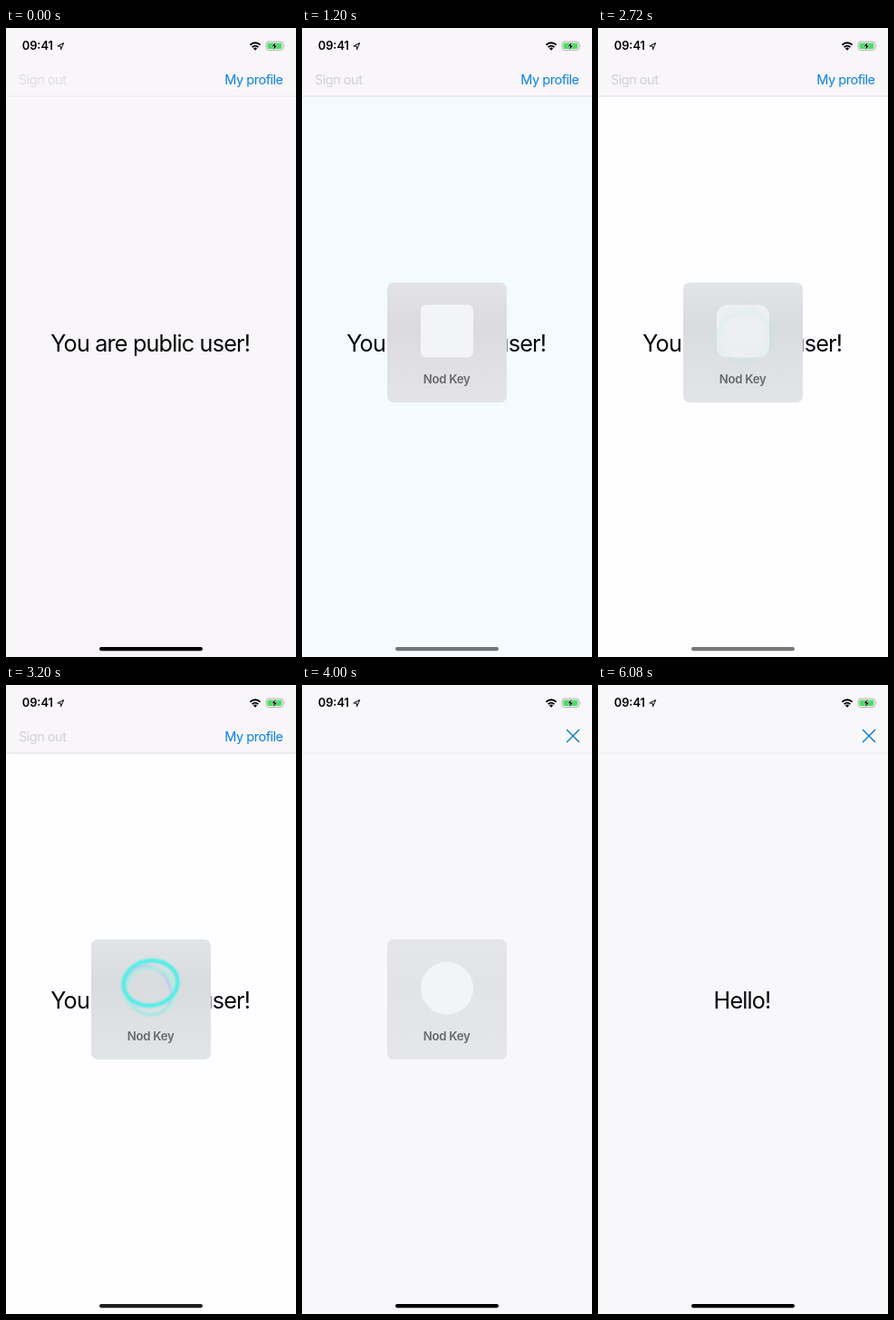
Animation of 320x692 px, one loop 6.16 s. Source, as an HTML page:

```html
<!DOCTYPE html>
<html lang="en">
<head>
<meta charset="utf-8">
<title>Profile unlock</title>
<style>
  html, body { margin: 0; width: 100%; height: 100%; overflow: hidden; background: #f8f6f9; }
  svg { display: block; width: 100vw; height: 100vh; }
  text { font-family: Inter, Roboto, "Liberation Sans", sans-serif; }
  .title { font-size: 25.2px; letter-spacing: -.82px; text-anchor: middle; fill: #08080a; }
  .nav { font-size: 14.5px; letter-spacing: -.48px; }
  .clock { font-size: 12.8px; font-weight: 600; letter-spacing: 0; }
  .label { font-size: 13.2px; font-weight: 600; letter-spacing: -.3px; text-anchor: middle; fill: #68696c; }
</style>
</head>
<body>
<svg viewBox="0 0 320 692" xmlns="http://www.w3.org/2000/svg">
  <defs>
    <linearGradient id="shade" x2="0" y2="1">
      <stop offset="0" stop-color="#85858a" stop-opacity="0"/>
      <stop offset=".38" stop-color="#85858a" stop-opacity=".1"/>
      <stop offset=".62" stop-color="#85858a" stop-opacity=".05"/>
      <stop offset="1" stop-color="#85858a" stop-opacity="0"/>
    </linearGradient>
    <filter id="soft" x="-30%" y="-30%" width="160%" height="160%">
      <feGaussianBlur stdDeviation=".8"/>
    </filter>
  </defs>

  <g id="home">
    <rect id="homeBody" width="320" height="692"/>
    <rect id="homeBar" width="320" height="75" fill="#f8f6f9"/>
    <rect id="homeLine" y="74.6" width="320" height=".9"/>
    <text id="signOut" class="nav" x="13.9" y="61.5">Sign out</text>
    <text class="nav" x="305.6" y="61.5" text-anchor="end" fill="#0a7ff0">My profile</text>
    <text class="title" x="159.2" y="355.5">You are public user!</text>
  </g>

  <g id="modal">
    <rect width="320" height="692" fill="#f8f7fa"/>
    <rect y="74.6" width="320" height=".9" fill="#e9e8eb"/>
    <path d="M292 49l14 14m0-14l-14 14" stroke="#147fd2" stroke-width="1.5"/>
    <text class="title" x="159" y="355.5">Hello!</text>
  </g>

  <g id="status">
    <text class="clock" x="17.7" y="24.4">09:41</text>
    <path d="M57 20L63.6 16.6 60.6 23.6 60.2 20.3z" fill="none" stroke="#222" stroke-width="1.1" stroke-linejoin="round"/>
    <g fill="none" stroke="#000" stroke-width="2">
      <path d="M269.4 18.6a8 8 0 0 1 11.2 0"/>
      <path d="M271.6 21.1a4.9 4.9 0 0 1 6.8 0"/>
    </g>
    <path d="M272.9 22.6a3 3 0 0 1 4.2 0l-2.1 2.1z"/>
    <rect x="287" y="15" width="18.8" height="9.4" rx="2.6" fill="#f8f7f9" stroke="#a7a7aa" stroke-width=".9"/>
    <path d="M306.9 18.2q1.6 1.5 0 3z" fill="#a7a7aa"/>
    <rect x="288.4" y="16.4" width="15.8" height="6.6" rx="1.4" fill="#4cdc66"/>
    <path d="M297.6 15.2l-4.6 5h2.7l-1 4.2 4.8-5.2h-2.8z" stroke="#f8f7f9" stroke-width=".5"/>
  </g>

  <rect id="indicator" x="103" y="681" width="114" height="4.2" rx="2.1"/>

  <g id="panel">
    <rect id="panelBase" x="94" y="280" width="132" height="132" rx="7"/>
    <rect id="panelShade" x="94" y="280" width="132" height="132" rx="7" fill="url(#shade)"/>
    <rect id="mark" x="131" y="304.5" width="58" height="58" fill="#f3f4f6"/>
    <g id="rings" fill="none" filter="url(#soft)">
      <ellipse stroke="#b9c8ee" stroke-width="2.6"/>
      <ellipse stroke="#a4efdf" stroke-width="4" stroke-opacity=".7"/>
      <ellipse stroke="#4deee6" stroke-width="4.4"/>
    </g>
    <text class="label" x="159.6" y="391">Nod Key</text>
  </g>
</svg>

<script>
const LOOP = 6160, STEP = 80;
const el = id => document.getElementById(id);
const set = (node, attrs) => {
  for (const key in attrs) node.setAttribute(key, attrs[key]);
};
const ramp = (t, from, to) => Math.min(1, Math.max(0, (t - from) / (to - from)));
const smooth = p => p * p * (3 - 2 * p);
const fade = (t, from, to) => smooth(ramp(t, from, to));
const rings = [...el('rings').children];

// Each ring is a circle seen at a tilt that changes as it spins.
function drawRings(t) {
  const turn = (t - 3200) / 900 * Math.PI * 2;
  const settle = 1 - fade(t, 3440, 3760);
  const poses = [
    { spin: 60, phase: 1.8, dx: -3, dy: 2, rx: 28 },
    { spin: 8, phase: .9, dx: -1, dy: 3, rx: 27 },
    { spin: -8, phase: 2.1, dx: -.5, dy: -6, rx: 30 }
  ];
  poses.forEach(({ spin, phase, dx, dy, rx }, i) => {
    const angle = spin + turn * 180 / Math.PI * (i === 1 ? -1 : 1);
    const tilt = .87 + .1 * Math.cos(turn + phase);
    const squash = 1 - (1 - tilt) * settle;
    const cx = 160 + (dx * Math.cos(turn) - dy * Math.sin(turn)) * settle;
    const cy = 334 + (dx * Math.sin(turn) + dy * Math.cos(turn)) * settle;
    set(rings[i], { rx, ry: rx * squash, transform: `translate(${cx} ${cy}) rotate(${angle})` });
  });
  set(el('rings'), { opacity: fade(t, 2680, 2920) * (1 - fade(t, 3520, 3760)) });
}

function draw(t) {
  const idle = t < 800, cool = !idle && t < 1440;
  set(el('homeBody'), { fill: idle ? '#f8f6f9' : cool ? '#f3fbff' : '#fefdff' });
  set(el('homeLine'), { fill: idle ? '#e9e8eb' : '#dcdde0' });
  set(el('signOut'), { fill: idle ? '#dedde0' : '#d0d0d3' });

  const slide = 1 - (1 - ramp(t, 3360, 3900)) ** 3.5;
  set(el('modal'), {
    transform: `translate(0 ${692 * (1 - slide)})`,
    visibility: slide > 0 ? 'visible' : 'hidden'
  });

  const dim = fade(t, 880, 1160) * (1 - ramp(t, 2960, 3280));
  set(el('indicator'), { opacity: 1 - .47 * dim });

  const shown = fade(t, 860, 1120) * (1 - fade(t, 4360, 4640));
  set(el('panel'), { opacity: shown, visibility: shown > 0 ? 'visible' : 'hidden' });
  set(el('panelBase'), { fill: cool ? '#e4e4e8' : t < 3360 ? '#e2e5e8' : '#e4e6ea' });
  set(el('panelShade'), { opacity: 1 - .7 * slide });

  const round = fade(t, 2640, 2880);
  set(el('mark'), {
    rx: 6 + 23 * round,
    opacity: 1 - fade(t, 2640, 2920) + fade(t, 3520, 3800)
  });
  drawRings(t);
}

const start = performance.now();
function tick() {
  const t = (performance.now() - start) % LOOP;
  draw(Math.floor(t / STEP) * STEP);
  requestAnimationFrame(tick);
}
draw(0);
requestAnimationFrame(tick);
</script>
</body>
</html>
```
